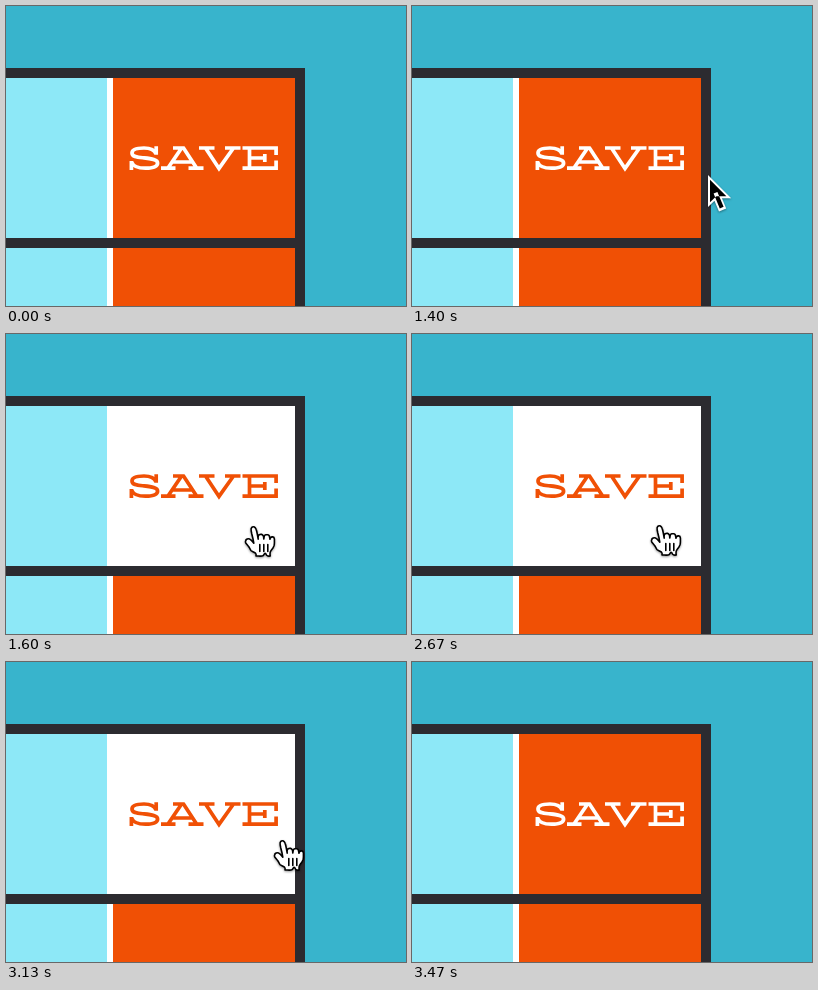
Write an HTML page that moves like this. It is 400 px wide and 300 px high and loops after 3.87 s.

```html
<!DOCTYPE html>
<html lang="en">
<head>
<meta charset="utf-8">
<title>Save button hover</title>
<style>
  html, body { margin: 0; width: 100%; height: 100%; overflow: hidden; background: #38b4cc; }
  svg { display: block; width: 100%; height: 100%; }
  .pointer { filter: drop-shadow(0 1.5px 1px rgba(0, 0, 0, .4)); }
</style>
</head>
<body>
<svg viewBox="0 0 400 300">
  <rect width="400" height="300" fill="#38b4cc"/>
  <rect y="62" width="299" height="238" fill="#2c2b30"/>
  <g id="rows">
    <path fill="#8de8f7" d="M0 72h101v160H0zM0 242h101v58H0z"/>
    <path fill="#fff" d="M101 72h6v160h-6zM101 242h6v58h-6z"/>
    <path fill="#f05005" d="M107 242h182v58H107z"/>
  </g>
  <rect id="button" x="107" y="72" width="182" height="160"/>

  <!-- wide slab lettering -->
  <g id="label" role="img" aria-label="SAVE" fill="none" stroke-width="3.7">
    <path d="M150.2 140.2v8.6M125.4 155v9M150 148C148.5 143.8 143.5 142 138 142C130 142 126 144 126 147C126 151 131 151.2 138 151.9C146 152.7 151.6 153.6 151.6 157C151.6 160.8 146 162.2 139.5 162.2C132 162.2 127 160 125.6 156"/>
    <path d="M167 142h11.2M175.6 142L162 162M177 141.2L190.6 162M166.5 156h20M155 162.2h14.5M182.5 162.2h15"/>
    <path d="M193 142h15.5M219 142h15.5M199.5 142L213 162.4L227.5 142"/>
    <path d="M236.5 142h33.6v7M236.5 162.2h33.6v-7.6M243.5 142v20M243.5 152h15M258.8 148v8"/>
  </g>

  <g id="arrow" class="pointer">
    <g transform="scale(2) translate(-8.2 -4.9)">
      <path fill="#fff" d="M8.2 20.9v-16l11.6 11.6H13l-.4.1zM17.3 21.6l-3.6 1.5L9 12l3.7-1.5z"/>
      <path fill="#000" d="M9.2 7.3v11.2l3-2.9.4-.1h4.8zM11 14.2l1.9-.8 3.1 7.4-1.9.8z"/>
    </g>
  </g>

  <g id="hand" class="pointer">
    <g transform="scale(2) translate(-12.2 -8)" fill="#fff" stroke="#000" stroke-width=".8" stroke-linejoin="round" stroke-linecap="round">
      <path d="M11.3 20.4C11 20 10.7 19.3 10.1 18.4C9.8 17.9 8.9 16.9 8.6 16.5Q8.3 16 8.5 15.5C8.6 14.9 9.2 14.4 9.9 14.4C10.4 14.4 10.9 14.8 11.3 15.1L12 15.9L12.6 16.6L12.2 14.4L11.6 12L11.3 10.5C11.2 10 11.2 9.1 11.6 8.7C11.9 8.4 12.5 8.3 12.9 8.5C13.4 8.8 13.7 9.5 13.8 9.8Q14.1 10.6 14.3 11.8L14.8 14.6Q14.7 13.6 14.8 13.1C14.9 12.8 15.1 12.4 15.5 12.3Q15.9 12.1 16.4 12.2Q16.9 12.3 17.2 12.7C17.6 13.3 17.6 14.6 17.6 14.5C17.7 14.1 17.7 13.3 17.9 12.9Q18.1 12.5 18.6 12.4Q19.1 12.3 19.6 12.4Q20.1 12.5 20.3 12.9C20.5 13.2 20.6 14.2 20.7 14.6Q20.7 14.3 21 13.9C21.4 13.3 22.8 13.1 22.9 14.5V16.4Q22.9 17.2 22.7 17.9Q22.5 18.4 22 19.3S20.9 20.6 20.8 21.1Q20.6 22 20.8 23Q20.2 23.1 19.6 23C19.2 22.9 18.7 22.2 18.6 21.9Q18.2 21.4 17.9 21.9C17.7 22.3 17.2 23 16.8 23C16.1 23.1 14.7 23 13.7 23Q13.9 22 13.5 21.6C13.2 21.3 11.6 20.7 11.3 20.4Z"/>
      <path fill="none" d="M15.6 17.3v3.4M17.6 17.3v3.4M19.6 17.3v3.4"/>
    </g>
  </g>
</svg>
<script>
  const LOOP = 3870, FPS = 15;
  const EDGE = 289;
  const REST = { x: 247, y: 192 };
  const byId = id => document.getElementById(id);
  const [button, label, arrow, hand] = ["button", "label", "arrow", "hand"].map(byId);

  // Pointer tip on each step, or null while it is off stage.
  function pointerAt(step) {
    if (step < 17 || step > 51) return null;
    if (step < 24) {
      const s = step - 17;
      return { x: 388 - 26.8 * s + 0.95 * s * s, y: 157 + s / 3 + s * s * 2 / 3 };
    }
    if (step < 40) return REST;
    const p = Math.max(0, (step - 43) / 8);
    return { x: REST.x + 141 * p ** 2.28, y: REST.y - 1 - 45 * p ** 1.79 };
  }

  function place(el, tip, visible) {
    el.setAttribute("visibility", visible ? "visible" : "hidden");
    if (visible) el.setAttribute("transform", `translate(${Math.round(tip.x)} ${Math.round(tip.y)})`);
  }

  function draw(ms) {
    // Steps run at 15 per second, rounded to hundredths of a second.
    const time = Math.floor(ms / 10) * 10;
    const tip = pointerAt(Math.floor((time + 3.4) * FPS / 1000));
    const hover = tip !== null && tip.x < EDGE;
    button.setAttribute("fill", hover ? "#fff" : "#f05005");
    label.setAttribute("stroke", hover ? "#f05005" : "#fff");
    place(arrow, tip, tip !== null && !hover);
    place(hand, tip, hover);
  }

  const start = performance.now();
  function tick() {
    draw((performance.now() - start) % LOOP);
    requestAnimationFrame(tick);
  }
  tick();
</script>
</body>
</html>
```
